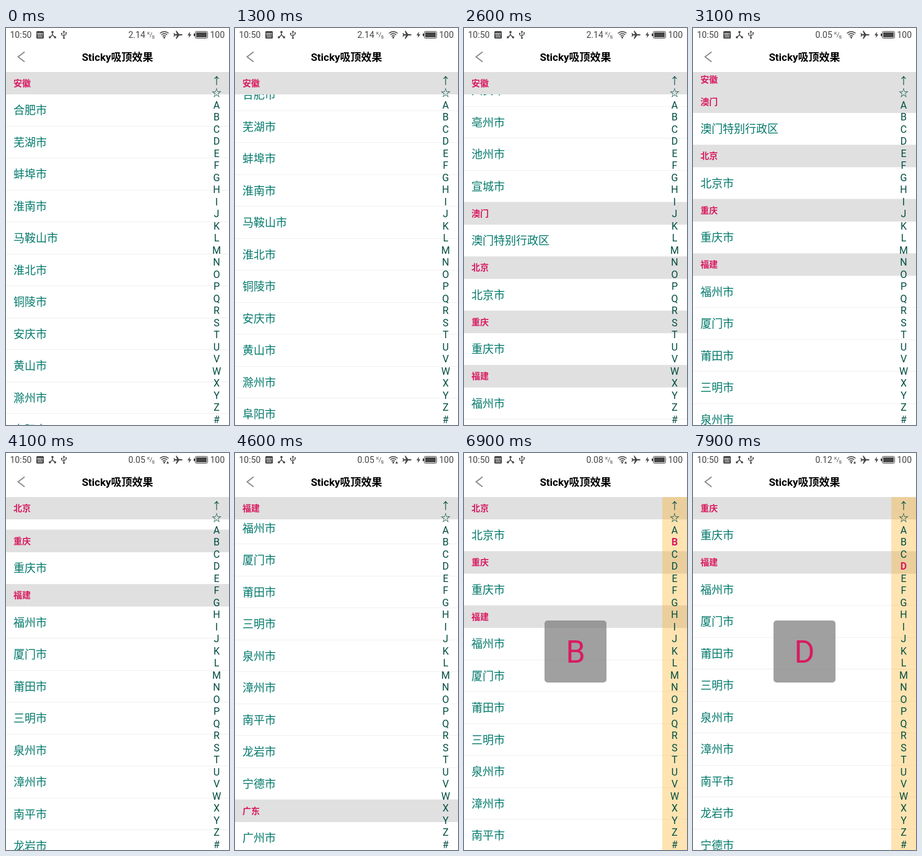
An HTML page with a canvas for the animation above (8 s loop, 360 px wide and 640 px high).

```html
<!DOCTYPE html>
<html lang="zh">
<head>
<meta charset="utf-8">
<style>
  html, body { margin: 0; width: 100%; height: 100%; overflow: hidden; background: #fff; }
  canvas { display: block; }
</style>
</head>
<body>
<canvas id="stage" width="360" height="640"></canvas>
<script>
const ctx = document.getElementById('stage').getContext('2d');
const LOOP = 8000, STEP = 100;
const LIST_TOP = 71, HEAD_H = 36, ROW_H = 51.5;
const FONT = 'Roboto, "Noto Sans CJK SC", "Noto Sans CJK", sans-serif';
const PINK = '#d81b60', TEAL = '#00796b', DARK_TEAL = '#004d40', STATUS = '#454545';

// "letter province: cities"; a name without a suffix gets 市
const sections = `
A 安徽: 合肥 芜湖 蚌埠 淮南 马鞍山 淮北 铜陵 安庆 黄山 滁州 阜阳 宿州 六安 亳州 池州 宣城
A 澳门: 澳门特别行政区
B 北京: 北京
C 重庆: 重庆
F 福建: 福州 厦门 莆田 三明 泉州 漳州 南平 龙岩 宁德
G 广东: 广州 深圳 珠海 汕头 佛山 韶关 湛江 肇庆 江门 茂名 惠州 梅州
H 河北: 石家庄 唐山 秦皇岛 邯郸 邢台 保定 张家口 承德 沧州 廊坊 衡水
J 江苏: 南京 无锡 徐州 常州 苏州 南通 连云港 淮安 盐城 扬州 镇江 泰州 宿迁
L 辽宁: 沈阳 大连 鞍山 抚顺 本溪 丹东 锦州 营口 阜新 辽阳 盘锦 铁岭 朝阳
N 内蒙古: 呼和浩特 包头 乌海 赤峰 通辽 鄂尔多斯 呼伦贝尔 巴彦淖尔 乌兰察布
N 宁夏: 银川 石嘴山 吴忠 固原 中卫
Q 青海: 西宁 海东 海北藏族自治州 黄南藏族自治州 海南藏族自治州 果洛藏族自治州 玉树藏族自治州 海西蒙古族藏族自治州
S 四川: 成都 自贡 攀枝花 泸州 德阳 绵阳 广元 遂宁 内江 乐山 南充 眉山`
  .trim().split('\n').map(line => {
    const [head, cities] = line.split(': ');
    const [letter, name] = head.split(' ');
    return { letter, name, rows: cities.split(' ').map(c => /[州]$/.test(c) && c.length > 3 || c.endsWith('区') ? c : c + '市') };
  });

let contentY = 0;
for (const s of sections) {
  s.top = contentY;
  contentY += HEAD_H + s.rows.length * ROW_H;
  s.bottom = contentY;
}

const index = [...'↑☆ABCDEFGHIJKLMNOPQRSTUVWXYZ#'];
const scrollKeys = [[0, 0], [1200, 0], [1300, 25], [1600, 215], [1700, 215], [1800, 270], [2000, 461],
  [2200, 461], [2500, 590], [2800, 770], [3100, 830], [3600, 830], [4600, 1134], [5000, 1290], [LOOP, 1290]];
const touches = [[5400, 'S'], [5500, 'Q'], [5600, 'P'], [5700, 'O'], [5800, 'N'], [5900, 'M'], [6000, 'L'],
  [6200, 'K'], [6300, 'J'], [6400, 'H'], [6500, 'G'], [6600, 'F'], [6700, 'C'], [6900, 'B'], [7100, 'A'],
  [7300, '☆'], [7400, 'A'], [7700, 'B'], [7800, 'C'], [7900, 'D']];
const speeds = [[0, '2.14'], [2700, '0.05'], [4800, '0.08'], [7700, '0.12']];
const wifiToggles = [100, 1000, 3700, 5900, 6300, 7300, 7700];

const past = (list, t) => list.filter(([at]) => at <= t);

function scrollAt(t) {
  const i = scrollKeys.findIndex(([at]) => at > t);
  const [t0, y0] = scrollKeys[i - 1], [t1, y1] = scrollKeys[i];
  return y0 + (y1 - y0) * (t - t0) / (t1 - t0);
}

function text(str, x, y, size, color, weight = 400, align = 'left') {
  ctx.font = `${weight} ${size}px ${FONT}`;
  ctx.fillStyle = color;
  ctx.textAlign = align;
  ctx.fillText(str, x, y);
}
function rect(x, y, w, h, color) {
  ctx.fillStyle = color;
  ctx.fillRect(x, y, w, h);
}
function rounded(x, y, w, h, r, color) {
  ctx.fillStyle = color;
  ctx.beginPath();
  ctx.roundRect(x, y, w, h, r);
  ctx.fill();
}
function stroke(path, width, color = STATUS) {
  ctx.lineWidth = width;
  ctx.strokeStyle = color;
  ctx.stroke(new Path2D(path));
}
function fill(path, color = STATUS) {
  ctx.fillStyle = color;
  ctx.fill(new Path2D(path));
}
function dot(x, y, r) {
  ctx.fillStyle = STATUS;
  ctx.beginPath();
  ctx.arc(x, y, r, 0, Math.PI * 2);
  ctx.fill();
}

function drawStatus(t) {
  text('10:50', 6.5, 16, 14, STATUS);
  // news
  rounded(49, 5, 12, 12, 1.5, STATUS);
  text('NEWS', 55, 10.5, 3.5, '#fff', 700, 'center');
  rect(51, 12, 8, 1, '#ccc');
  rect(51, 14, 8, 1, '#ccc');
  // linked nodes
  stroke('M75 7V11L71 15M75 11L79 15', 1.4);
  dot(75, 6.5, 1.8); dot(70.8, 15, 1.8); dot(79.2, 15, 1.8);
  // usb
  stroke('M93.5 6V16M90 9V11.5L93.5 13.5M97 8V10.5L93.5 12.5', 1.1);
  fill('M93.5 4L95.5 7H91.5Z');
  dot(93.5, 16, 1.5); dot(90, 9, 1.2);
  rect(96, 7, 2, 2, STATUS);

  text(past(speeds, t).pop()[1], 197.5, 16, 14, STATUS);
  text('K', 228, 11, 7, STATUS);
  stroke('M232.5 15L235.5 7', .8);
  text('s', 235.5, 16.5, 9, STATUS);
  // wifi
  stroke('M248.5 8.5Q255.5 2.8 262.5 8.5M250.7 11Q255.5 7 260.3 11M252.9 13.4Q255.5 11.2 258.1 13.4', 1.5);
  dot(255.5, 15.5, 1.4);
  if (wifiToggles.filter(at => at <= t).length % 2) fill('M261 13L263 17H259Z');
  // airplane
  fill('M285 11Q285 10 283 10H279.5L275.5 4.5H274L276 10H273L271.5 8H270.5L271.3 11L270.5 14H271.5L273 12H276L274 17.5H275.5L279.5 12H283Q285 12 285 11Z');
  // battery
  fill('M297 6L293 11.8H295.7L295 16L299.3 10.2H296.5Z');
  ctx.lineWidth = 1;
  ctx.strokeStyle = STATUS;
  ctx.beginPath();
  ctx.roundRect(305.5, 5.5, 20, 11, 2);
  ctx.stroke();
  rect(307, 7, 17, 8, STATUS);
  rect(303, 9, 2, 4, STATUS);
  text('100', 329.5, 16, 14, STATUS);

  stroke('M30 38.5L19.5 46.5L30 54.5', 1.8, '#8a8a8a');
  text('Sticky吸顶效果', 180, 52.5, 17, '#000', 700, 'center');
}

function drawHeader(name, y) {
  rect(0, y, 360, HEAD_H, '#e0e0e0');
  text(name, 12, y + 22.8, 14, PINK, 700);
}

function drawList(scroll) {
  ctx.save();
  ctx.beginPath();
  ctx.rect(0, LIST_TOP, 360, 640 - LIST_TOP);
  ctx.clip();
  for (const s of sections) {
    const top = LIST_TOP + s.top - scroll, bottom = LIST_TOP + s.bottom - scroll;
    if (bottom < LIST_TOP || top > 640) continue;
    s.rows.forEach((city, i) => {
      const y = top + HEAD_H + i * ROW_H;
      text(city, 12, y + 32.3, 18, TEAL);
      rect(0, Math.round(y + ROW_H - 1), 360, 1, '#f2efef');
    });
    drawHeader(s.name, Math.max(top, Math.min(LIST_TOP, bottom - HEAD_H)));
  }
  ctx.restore();
}

function drawIndex(active) {
  if (active) rect(320, LIST_TOP, 40, 640 - LIST_TOP, 'rgba(255,165,0,.3)');
  index.forEach((ch, i) => {
    const on = ch === active;
    text(ch, 340, 90.6 + i * 19.5, 16, on ? PINK : DARK_TEAL, on ? 700 : 400, 'center');
  });
  if (active) {
    rounded(130, 270, 100, 100, 5, 'rgba(128,128,128,.75)');
    text(active, 180, 338, 50, PINK, 400, 'center');
  }
}

function draw(t) {
  const touched = past(touches, t).map(([, ch]) => ch);
  const findSection = ch => sections.find(s => s.letter === ch);
  const jump = touched.map(findSection).filter(Boolean).pop();
  rect(0, 0, 360, 640, '#fff');
  drawList(jump ? jump.top : scrollAt(t));
  drawStatus(t);
  drawIndex(touched.pop());
}

const start = performance.now();
function frame() {
  const t = (performance.now() - start) % LOOP;
  draw(Math.floor(t / STEP) * STEP);
  requestAnimationFrame(frame);
}
frame();
</script>
</body>
</html>
```
